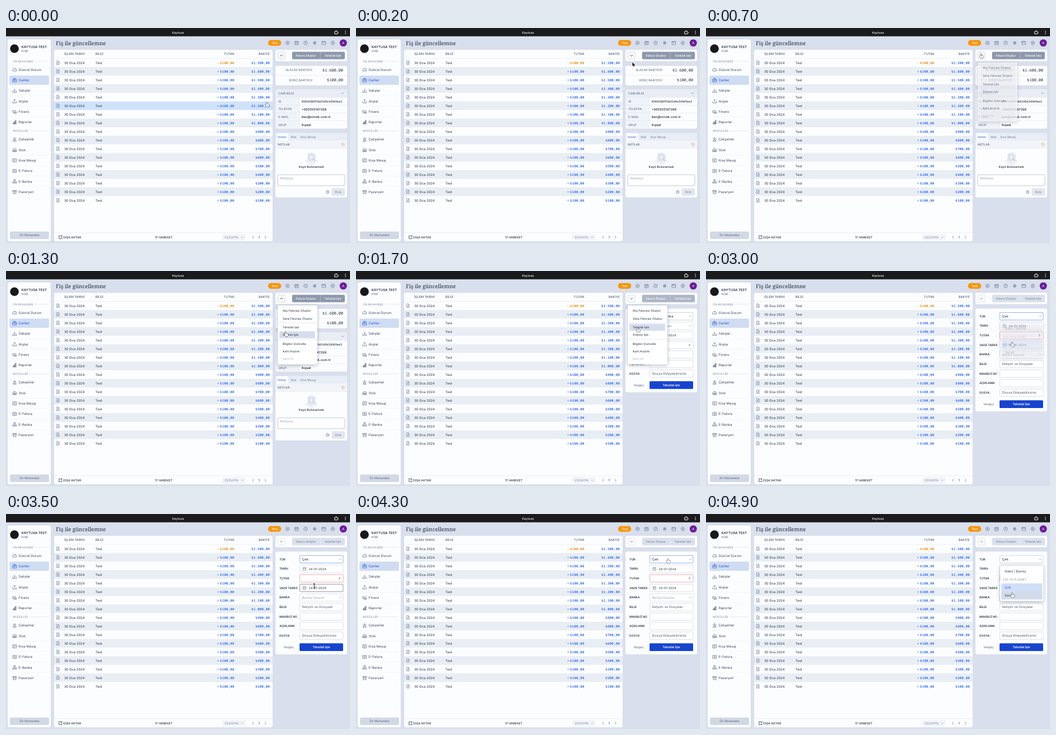
Recreate the animation shown at these times as an HTML page with a canvas. Size 600 by 375 pixels, loop 5 s.

```html
<!DOCTYPE html>
<html lang="tr">
<head>
<meta charset="utf-8">
<title>Kaytusa</title>
<style>
html, body { margin: 0; width: 100%; height: 100%; overflow: hidden; background: #d9dfec; }
canvas { display: block; width: 600px; height: 375px; }
</style>
</head>
<body>
<canvas id="stage"></canvas>
<script>
const LOOP = 5000, STEP = 100;
const canvas = document.getElementById('stage');
const ctx = canvas.getContext('2d');
const dpr = window.devicePixelRatio || 1;
canvas.width = 600 * dpr;
canvas.height = 375 * dpr;

const SANS = 'Inter, "Noto Sans", sans-serif';
const SERIF = '"Noto Serif", serif';
const MONO = '"Noto Sans Mono", "DejaVu Sans Mono", monospace';
const INK = '#27324a', MUTED = '#7482a0', SLATE = '#55637f', LINE = '#d5dce8';
const BLUE = '#2f66dc', STRIPE = '#e9eef5', ORANGE = '#e9992c';

// Icons live in a 10 x 10 box.
const ICONS = {
  gauge: 'M1 8A4.3 4.3 0 1 1 9 8ZM5 6L7 3.5',
  case: 'M1 3H9V9H1ZM3.5 3V1H6.5V3M1 5.5H9M5 5V6.5',
  trayOut: 'M1 5.5V9H9V5.5M5 1V6.5M2.8 4.4L5 6.6L7.2 4.4',
  trayIn: 'M1 5.5V9H9V5.5M5 6.8V1.2M2.8 3.4L5 1.2L7.2 3.4',
  bank: 'M1 3H7V7H1ZM3 8.7H9V5M4 4.4V5.6',
  chart: 'M1 9H9M2 9V6H3.5V9M4.3 9V3.5H5.8V9M6.6 9V1H8.2V9',
  people: 'M5 1.5A1.7 1.7 0 1 0 5 5A1.7 1.7 0 1 0 5 1.5M1.5 9A3.5 3 0 0 1 8.5 9ZM1 4H2M8 4H9',
  box: 'M1 4L5 1.5L9 4V9H1ZM3 9V5.5H7V9M3 7H7',
  chat: 'M1 1.5H9V8.5H1ZM3 4H7M3 6H6',
  mail: 'M1 2H9V8.5H1ZM3 4.2H7M3 6.3H7',
  blocks: 'M3.5 1H6.5V4H3.5ZM1 6H4V9H1ZM6 6H9V9H6Z',
  shop: 'M1 2H9V4H1ZM2 4V9H8V4M4 6H6',
  plus: 'M9.2 5A4.2 4.2 0 1 1 .8 5A4.2 4.2 0 1 1 9.2 5M5 2.8V7.2M2.8 5H7.2',
  calendar: 'M1 1.8H9V9H1ZM1 4H9M3 .8V2.5M7 .8V2.5M3 5.6H4M6 5.6H7M3 7.3H4M6 7.3H7',
  ring: 'M9.2 5A4.2 4.2 0 1 1 .8 5A4.2 4.2 0 1 1 9.2 5',
  command: 'M3.7 1V9M6.3 1V9M1 3.7H9M1 6.3H9',
  win: 'M.8 1.5H9.2V8.7H.8ZM.8 3.6H9.2M2 2.5H3',
  gear: 'M3 1H7L9.3 5L7 9H3L.7 5ZM6.5 5A1.5 1.5 0 1 1 3.5 5A1.5 1.5 0 1 1 6.5 5',
  page: 'M1.8 .7H6L8.2 3V9.3H1.8ZM6 .7V3H8.2M3.3 5H6.7M3.3 7H6.7',
  clock: 'M9.2 5A4.2 4.2 0 1 1 .8 5A4.2 4.2 0 1 1 9.2 5M5 2.5V5L7 6',
  history: 'M1.5 2V4.3H4M1.8 4A3.8 3.8 0 1 1 2 7M5 3V5.3L7 6.2',
  exit: 'M6 1H1V9H9V5M5 5L9 1M6.5 1H9V3.5',
  puzzle: 'M1 3H3.5A1.4 1.4 0 1 1 6 3H8V5A1.4 1.4 0 1 1 8 7.3V9H1Z'
};

function rect(x, y, w, h, fill, r = 0, stroke, lw = .6) {
  ctx.beginPath();
  ctx.roundRect(x, y, w, h, r);
  if (fill) { ctx.fillStyle = fill; ctx.fill(); }
  if (stroke) { ctx.strokeStyle = stroke; ctx.lineWidth = lw; ctx.stroke(); }
}
function card(x, y, w, h) { rect(x, y, w, h, '#fcfdfe', 3); }
function disc(x, y, r, fill) {
  ctx.beginPath();
  ctx.arc(x, y, r, 0, 7);
  ctx.fillStyle = fill;
  ctx.fill();
}
function line(x1, y1, x2, y2, color = LINE, lw = .6) {
  ctx.beginPath();
  ctx.moveTo(x1, y1);
  ctx.lineTo(x2, y2);
  ctx.strokeStyle = color;
  ctx.lineWidth = lw;
  ctx.stroke();
}
// y is the middle of the capitals.
function text(s, x, y, size = 5.8, color = INK, { align = 'left', weight = 400, font = SANS } = {}) {
  ctx.font = `${weight} ${size}px ${font}`;
  ctx.textAlign = align;
  ctx.fillStyle = color;
  ctx.fillText(s, x, y + size * .36);
}
function icon(name, x, y, size, color, lw = .75) {
  ctx.save();
  ctx.translate(x - size / 2, y - size / 2);
  ctx.scale(size / 10, size / 10);
  ctx.strokeStyle = color;
  ctx.lineWidth = lw * 10 / size;
  ctx.lineJoin = 'round';
  ctx.stroke(new Path2D(ICONS[name]));
  ctx.restore();
}
function chevron(x, y, w, up, color, lw = .8) {
  const d = up ? -w / 4 : w / 4;
  ctx.beginPath();
  ctx.moveTo(x - w / 2, y - d);
  ctx.lineTo(x, y + d);
  ctx.lineTo(x + w / 2, y - d);
  ctx.strokeStyle = color;
  ctx.lineWidth = lw;
  ctx.stroke();
}
function faded(alpha, draw) {
  if (alpha <= 0) return;
  ctx.save();
  ctx.globalAlpha = alpha;
  draw();
  ctx.restore();
}
function floating(x, y, w, h) {
  ctx.save();
  ctx.shadowColor = 'rgba(40,55,90,.35)';
  ctx.shadowBlur = 6 * dpr;
  ctx.shadowOffsetY = 1.5 * dpr;
  rect(x, y, w, h, '#fff', 2);
  ctx.restore();
}
const clamp = v => Math.max(0, Math.min(1, v));
const mix = (a, b, k) => `rgb(${a.map((v, i) => Math.round(v + (b[i] - v) * k))})`;
const lira = n => '₺' + (n >= 1000 ? Math.floor(n / 1000) + '.' + String(n % 1000).padStart(3, '0') : n) + ',00';

function drawTop() {
  rect(0, 0, 600, 375, '#d9dfec');
  rect(0, 0, 600, 14.5, '#1b1b1d');
  text('Kaytusa', 300, 7.8, 5.3, '#eee', { align: 'center', weight: 500 });
  icon('puzzle', 576, 7.5, 7, '#eee', 1);
  for (let i = -1; i < 2; i++) disc(592, 7.8 + i * 2.3, .75, '#eee');

  text('Fiş ile güncellemne', 87, 26.5, 9.5, '#222b40', { font: SERIF });
  rect(457, 21, 23, 10, '#f5970f', 5);
  text('Test', 468.5, 26, 5, '#fff', { align: 'center', weight: 500 });
  ['plus', 'calendar', 'ring', 'command', 'win', 'gear'].forEach((n, i) =>
    icon(n, 491 + i * 15.8, 26, 7.6, '#5f6d89', .65));
  text('?', 522.7, 26, 5.2, '#5f6d89', { align: 'center', weight: 500 });
  disc(588.3, 26, 6.3, '#6d1b9a');
  text('A', 588.3, 26, 5.6, '#fff', { align: 'center' });
}

function drawSidebar() {
  card(3, 20, 75, 352);
  disc(14.7, 36, 7.6, '#17181c');
  text('KAYTUSA TEST', 27, 32.5, 5.8, INK, { weight: 600 });
  text('KOBİ', 27, 40.5, 5, SLATE);
  const group = (title, y, lineX, items) => {
    text(title, 12, y, 4.8, '#7d8aa6');
    line(lineX, y, 75, y);
    items.forEach(([name, glyph], i) => {
      const cy = y + 14.6 + i * 18.3, on = name === 'Cariler';
      if (on) rect(6, cy - 8, 69, 16, '#d0dcf2', 2);
      else if (i > 1) line(8, cy - 9.2, 75, cy - 9.2, '#edf1f7', .5);
      icon(glyph, 15, cy, 8, on ? BLUE : '#5d6b88');
      text(name, 22, cy, 5.9, on ? BLUE : '#3c4964', { weight: on ? 500 : 400 });
    });
  };
  group('ÖN MUHASEBE', 58, 50, [['Güncel Durum', 'gauge'], ['Cariler', 'case'], ['Satışlar', 'trayOut'],
    ['Alışlar', 'trayIn'], ['Finans', 'bank'], ['Raporlar', 'chart']]);
  group('MODÜLLER', 179.6, 40, [['Çalışanlar', 'people'], ['Stok', 'box'], ['Kısa Mesaj', 'chat'],
    ['E-Fatura', 'mail'], ['E-Banka', 'blocks'], ['Pazaryeri', 'shop']]);
  rect(7, 355, 68, 13, '#d2d9e5', 2);
  text('Ön Muhasebe', 41, 361.5, 5.3, '#586784', { align: 'center' });
}

function drawTable(hoverRow) {
  card(84, 38, 381, 334);
  const head = { weight: 500 }, headR = { weight: 500, align: 'right' };
  text('İŞLEM TARİHİ', 101.5, 45, 5.5, SLATE, head);
  text('BİLGİ', 156, 45, 5.5, SLATE, head);
  text('TUTAR', 398, 45, 5.4, SLATE, headR);
  text('BAKİYE', 460, 45, 5.4, SLATE, headR);
  line(84, 53, 465, 53, '#dfe5ee');
  const num = { weight: 600, font: MONO, align: 'right' };
  for (let i = 0; i < 17; i++) {
    const y = 60.5 + i * 15;
    if (i === hoverRow) rect(84, y - 7.5, 381, 15, '#d1e2fb');
    else if (i % 2) rect(84, y - 7.5, 381, 15, STRIPE);
    icon('page', 90.5, y, 7.5, '#6d7a95', .65);
    text('30 Oca 2024', 101.5, y, 5.75);
    text('Test', 156, y, 5.8);
    const color = i ? '#4a7de8' : ORANGE;
    text(i ? '+' : '-', 371.8, y, 5.8, color, num);
    text('₺100,00', 398, y, 5.85, color, num);
    text(lira(i ? 1700 - i * 100 : 1500), 460, y, 5.9, '#4a7de8', num);
  }
  line(84, 357, 465, 357, '#dfe5ee');
  icon('exit', 95, 364.8, 6.5, INK);
  text('DIŞA AKTAR', 100, 365, 5.2, INK, { weight: 500 });
  text('17 HAREKET', 275, 365, 5.2, INK, { align: 'center', weight: 500 });
  rect(377, 359.5, 41, 11, '#f2f4f9', 2);
  text('25/SAYFA', 381, 365, 5.2, '#7c88a0');
  chevron(412, 365, 4, false, '#98a3b8', .7);
  text('1', 441.5, 365, 5.6, BLUE, { align: 'center', weight: 600 });
  [[431, -1], [452.5, 1]].forEach(([x, d]) => {
    line(x - d, 362.5, x + d, 365, '#65728d', .7);
    line(x + d, 365, x - d, 367.5, '#65728d', .7);
  });
}

function drawActions(off, open) {
  card(470, 38, 125, 20);
  rect(474.5, 42, 12, 12, '#fff', 1.5, mix([188, 196, 211], [210, 217, 228], off), .7);
  chevron(480.5, 48, 4.6, open, mix([30, 38, 56], [100, 112, 136], off), .9);
  rect(499, 41.5, 92, 13, mix([142, 152, 172], [219, 225, 236], off), 2);
  line(548.3, 41.5, 548.3, 54.5, mix([190, 198, 212], [244, 246, 250], off), .7);
  const color = mix([255, 255, 255], [126, 139, 166], clamp(off * 2 - 1));
  const opt = { align: 'center', weight: 500 };
  text('Fatura Oluştur', 523, 48, 5.2, color, opt);
  text('Tahsilat İşle', 570, 48, 5.2, color, opt);
}

function drawDetails() {
  card(470, 66, 125, 34);
  [['ALACAK BAKİYESİ', 73.5, 1600], ['BORÇ BAKİYESİ', 91, 100]].forEach(([label, y, n]) => {
    text(label, 534, y, 5.3, SLATE, { align: 'right' });
    text(lira(n), 588, y, 6.65, '#20293c', { align: 'right', weight: 500, font: MONO });
  });
  line(470, 82.7, 595, 82.7, '#dfe5ee');

  card(470, 107, 125, 68.5);
  rect(470, 107, 125, 14, '#e9eef6', [3, 3, 0, 0]);
  rect(470, 121, 42, 54.5, '#f0f3f8', [0, 0, 0, 3]);
  text('CARİ BİLGİ', 475, 113.8, 5.4, SLATE);
  chevron(587, 113.8, 4.5, false, '#7d8ba7');
  [['ID', '6583096f10b0341e34941ee3', 5], ['TELEFON', '+905550147298', 5.5],
    ['E-MAİL', 'ben@ornek.com.tr', 5.7], ['GRUP', 'İnşaat', 5.7]].forEach(([label, value, size], i) => {
    const y = 128 + i * 13.6;
    line(470, y - 7, 595, y - 7, '#dfe5ee');
    text(label, 475, y, 5.2, SLATE);
    text(value, 515.5, y, size, '#1b2437', { weight: 500 });
  });
  line(512, 121, 512, 175.5, '#dfe5ee');

  card(470, 183, 125, 112.5);
  rect(470, 183, 125, 13.5, '#e9eef6', [3, 3, 0, 0]);
  rect(472, 183.5, 20, 13, '#fcfdfe', [2, 2, 0, 0]);
  text('Notlar', 474, 189.8, 5.2, BLUE);
  text('Mail', 496.5, 189.8, 5.2, MUTED);
  text('Kısa Mesaj', 513.5, 189.8, 5.2, MUTED);
  rect(470, 196.5, 125, 13.5, '#f1f4f9');
  text('NOTLAR', 474, 203.3, 5.1, SLATE, { weight: 500 });
  icon('history', 587.5, 203.3, 6.5, '#efb264', .8);
  line(470, 210, 595, 210, '#dfe5ee');

  ctx.fillStyle = '#eef1f6';
  ctx.fill(new Path2D('M520 232L532 225L545 232L533 240Z'));
  ctx.fillStyle = '#e1e6ef';
  ctx.fill(new Path2D('M526 219L534 217L540 221V230L531 234L526 231Z'));
  disc(532.5, 225.5, 3.6, '#c9d1df');
  disc(532.5, 225.5, 2.7, '#f3f5f9');
  line(535, 228, 539, 232, '#c4cddc', 1.2);
  text('Kayıt Bulunamadı', 532.5, 242.3, 5.3, INK, { align: 'center', weight: 500 });
  rect(474, 256, 117, 19, '#fff', 1.5, '#aab4c7', .7);
  text('Notunuz', 478, 262, 5.7, '#929db2');
  line(587, 274, 590, 271, '#a4aec0', .5);
  icon('clock', 561, 286, 6, '#65728d');
  rect(568, 279.5, 23, 13, '#e1e6ef', 2);
  text('Ekle', 579.5, 286, 5.5, '#7988a6', { align: 'center' });
}

function drawForm(t) {
  const cheque = t >= 2900, loading = t < 1800;
  const date = { value: '24-01-2024', cal: true };
  const amount = { lira: true, border: loading ? '#ccd4e1' : '#f0868b' };
  const type = {
    value: cheque ? 'Çek' : 'Nakit / Banka', select: true,
    border: t >= 2300 && t < 4400 ? '#6c97ea' : '#bcc8dc',
    up: (t >= 2500 && t < 2900) || t >= 4500
  };
  const tail = [['MAKBUZ NO', {}], ['AÇIKLAMA', {}], ['DOSYA', { value: 'Dosya Ekleyebilirsiniz', soft: true }]];
  const due = { ...date, border: t >= 3500 && t < 4000 ? '#66738c' : undefined };
  const rows = cheque
    ? [['TÜR', type], ['TARİH', date], ['TUTAR', amount], ['VADE TARİHİ', due],
      ['BANKA', { value: 'Banka Seçiniz', select: true, pale: true }],
      ['BİLGİ', { value: 'İletişim ve Dosyalar', soft: true }], ...tail]
    : [['TÜR', type], ['HESAP', { value: 'Kasa Hesabı', select: true, pale: loading }],
      ['TARİH', date], ['TUTAR', amount], ...tail];
  const bottom = 79 + rows.length * 16.65;
  card(470, 65.5, 125, bottom + 16 - 65.5);
  rows.forEach(([label, f], i) => {
    const y = 79 + i * 16.65;
    text(label, 477, y, 5, INK, { weight: 600 });
    rect(512.5, y - 6.5, 75.5, 13, '#fff', 1, f.border || '#ccd4e1', .7);
    if (f.cal) icon('calendar', 520.5, y, 6.5, '#6c7891', .6);
    if (f.value) text(f.value, f.cal ? 528 : 516.5, y, f.cal ? 5.4 : 5.9, f.pale ? '#9ba6b9' : f.soft ? '#536078' : INK);
    if (f.select) chevron(583, y, 4, f.up, '#8d98ad', .7);
    if (f.lira) text('₺', 582, y, 5.8, '#66738d', { align: 'center', font: MONO });
  });
  text('Vazgeç', 493, bottom + 3.6, 5.2, SLATE, { align: 'center' });
  rect(512, bottom - 3.3, 76, 13.5, '#1744cf', 1.5);
  text('Tahsilat İşle', 550, bottom + 3.5, 5.3, '#fff', { align: 'center', weight: 600 });
}

function drawMenu(cur) {
  floating(474, 60, 69, 103);
  [['Alış Faturası Oluştur', 69.5], ['Satış Faturası Oluştur', 82.7], ['Tahsilat İşle', 98.2], ['Ödeme İşle', 111.3],
    ['Bilgileri Güncelle', 127], ['Kartı Arşivle', 140.2], ['Kartı Sil', 153.5]].forEach(([s, y], i) => {
    if (Math.abs(cur.y - 1 - y) < 6.4) rect(477, y - 6, 62, 12, '#d6ddec', 1);
    text(s, 482.5, y, 5.2, i === 6 ? '#a8b1c1' : INK);
  });
  line(474, 90.4, 543, 90.4);
  line(474, 119.2, 543, 119.2);
}

function drawOptions(cur, cheque) {
  floating(513, 90, 75.5, 62);
  text('ÇEK VEYA SENET', 518, 114.7, 4.9, '#8591a8');
  [['Nakit / Banka', 99.8, !cheque], ['Çek', 128, cheque], ['Senet', 142, false]].forEach(([s, y, on]) => {
    const hover = Math.abs(cur.y - 1 - y) < 7;
    if (on || hover) rect(515, y - 7, 71.5, 14, on ? '#d0dff8' : '#d3dbea', 1);
    text(s, 521, y, 5.9, on ? BLUE : '#3c4964');
  });
}

// time, x, y, shape from then on
const PATH = [
  [0, 456, 133.5, 'hand'], [100, 470, 95, 'arrow'], [200, 484, 63.5, 'arrow'], [300, 482, 51, 'hand'],
  [500, 480.5, 48.5, 'hand'], [1000, 480.5, 48.5, 'hand'], [1100, 481.5, 59, 'hand'], [1300, 489, 110, 'hand'],
  [1500, 492.5, 102.5, 'hand'], [1800, 492.5, 102.5, 'hand'], [2000, 519, 93, 'arrow'], [2300, 549.5, 84, 'hand'],
  [2500, 549.5, 84, 'hand'], [2800, 535, 128, 'hand'], [3200, 535, 128, 'arrow'], [3500, 537.5, 125.5, 'beam'],
  [3900, 537.5, 125.5, 'beam'], [4000, 539, 116, 'arrow'], [4200, 545, 82, 'hand'], [4500, 545, 82, 'hand'],
  [4700, 539, 118, 'hand'], [4900, 535, 141.5, 'hand']
];
function cursorAt(t) {
  let i = PATH.length - 1;
  while (PATH[i][0] > t) i--;
  const a = PATH[i], b = PATH[i + 1] || a;
  const k = b === a ? 0 : (t - a[0]) / (b[0] - a[0]);
  return { x: a[1] + (b[1] - a[1]) * k, y: a[2] + (b[2] - a[2]) * k, shape: a[3] };
}
const HAND = new Path2D('M-1.9 .3V-3.1A.75 .75 0 0 1 -.4 -3.1V-.8L2.4 -.2Q3.3 .1 3.1 1.2L2.4 4H-1.3L-3.3 1Q-3.4 0 -2.5 .2Z');
const ARROW = new Path2D('M-1.8 -3.5V3L-.3 1.7L.8 4L1.9 3.5L.9 1.3H2.8Z');
function drawCursor({ x, y, shape }) {
  ctx.save();
  ctx.translate(x, y);
  ctx.lineJoin = 'round';
  if (shape === 'beam') {
    line(0, -3.5, 0, 3.5, '#111', .9);
    line(-1.5, -4, 1.5, -4, '#111', .7);
    line(-1.5, 4, 1.5, 4, '#111', .7);
  } else {
    const hand = shape === 'hand', p = hand ? HAND : ARROW;
    ctx.fillStyle = hand ? '#fff' : '#000';
    ctx.strokeStyle = hand ? '#111' : '#fff';
    ctx.lineWidth = hand ? .9 : 1.1;
    ctx.stroke(p);
    ctx.fill(p);
  }
  ctx.restore();
}

function draw(t) {
  ctx.setTransform(dpr, 0, 0, dpr, 0, 0);
  ctx.textRendering = 'geometricPrecision';
  const cur = cursorAt(t), form = t >= 1700;
  drawTop();
  drawSidebar();
  drawTable(t < 100 ? 5 : -1);
  drawActions(form ? clamp(.4 + (t - 1700) / 400) : 0, t >= 600 && !form);
  if (form) drawForm(t); else drawDetails();

  const menu = t < 1800 ? clamp((t - 500) / 300) : clamp((2000 - t) / 300);
  faded(menu, () => drawMenu(cur));
  const options = t < 2900 ? clamp((t - 2400) / 200)
    : t < 4000 ? clamp((3100 - t) / 300) : clamp((t - 4400) / 200);
  faded(options, () => drawOptions(cur, t >= 2900));
  drawCursor(cur);
}

const start = performance.now();
function tick() {
  const t = (performance.now() - start) % LOOP;
  draw(Math.floor(t / STEP) * STEP);
  requestAnimationFrame(tick);
}
tick();
</script>
</body>
</html>
```
